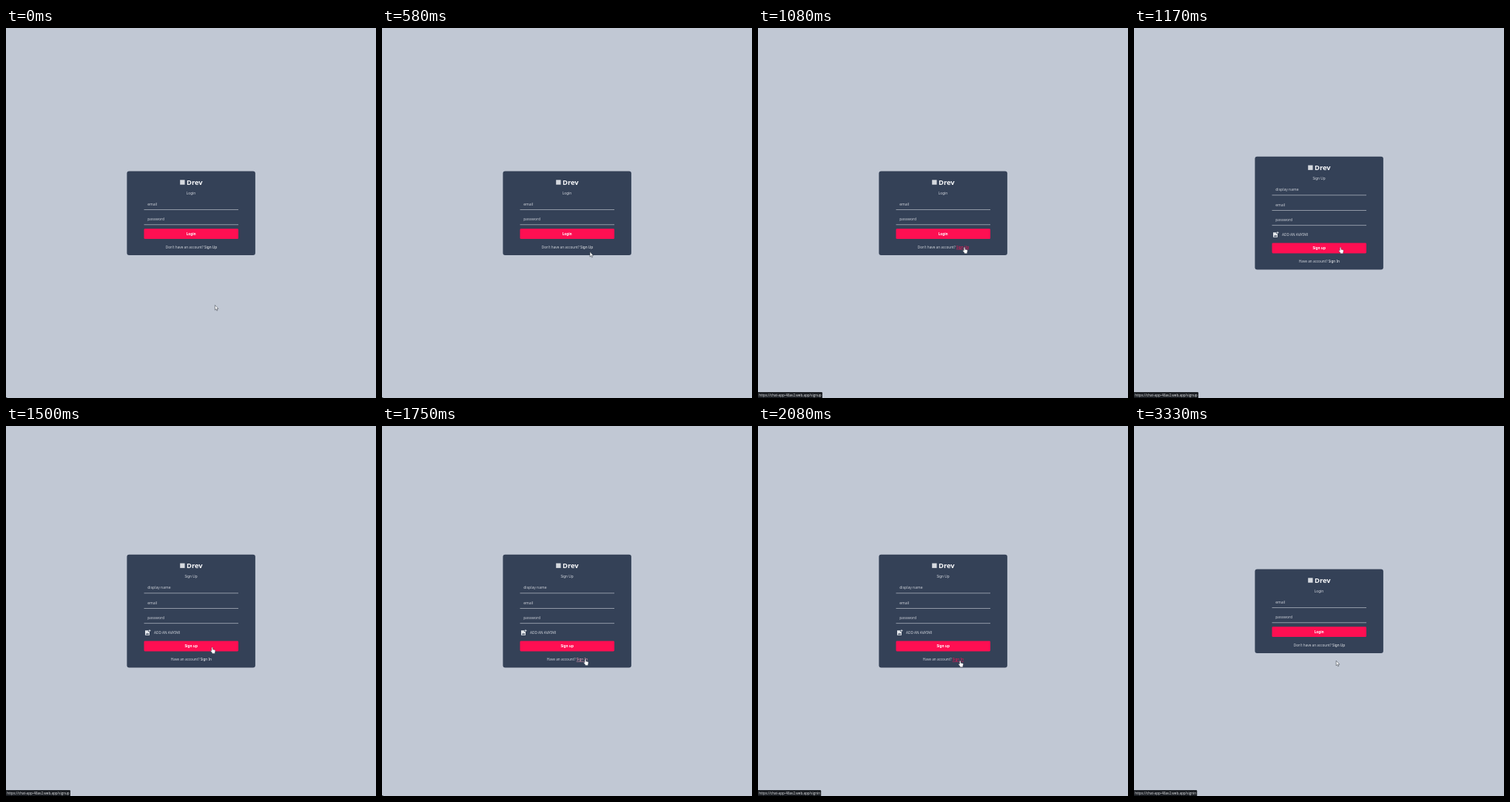
Recreate the animation shown at these times as an HTML page. Size 500 by 500 pixels, loop 3410 ms.

```html
<!DOCTYPE html>
<html lang="en">
<head>
<meta charset="utf-8">
<title>Login and sign up</title>
<style>
  html, body { margin: 0; height: 100%; overflow: hidden; background: #c1c8d4; }
  svg { display: block; width: 100vw; height: 100vh; }
  text { font: 4.7px "Noto Sans", sans-serif; fill: #d3d7de; white-space: pre; }
  .mid { text-anchor: middle; }
  .title { font-size: 9.4px; font-weight: 700; fill: #f7f8fa; }
  .field { font-size: 5px; font-weight: 500; fill: #c9cdd5; }
  .button { font-weight: 700; fill: #fff; }
  .link { fill: #f4f5f7; font-weight: 500; }
  .status { font: 4.6px "Open Sans", sans-serif; fill: #e8eaed; }
</style>
</head>
<body>
<svg viewBox="0 0 500 500">
  <g id="login"></g>
  <g id="signup"></g>
  <rect id="speck" y="499" width="1.4" height="1" fill="#3a4048"/>
  <g id="status">
    <path id="bubble" fill="#1d2025"/>
    <text id="url" class="status" x="1.3" y="497.8"></text>
  </g>
  <path id="arrow" d="M0 0V6.6L1.5 5.3 2.5 7.6 3.5 7.1 2.5 4.9H4.6Z"
        fill="#fff" stroke="#343b47" stroke-width=".55" stroke-linejoin="round"/>
  <path id="hand" d="M-.8 .6Q0-.5 .8 .6V3L3.2 3.5Q4.4 3.8 4.2 5L3.6 7.2V8.6H-.2V7.6L-2.2 5Q-2.3 4-1.4 4.2L-.8 4.8Z"
        fill="#fff" stroke="#343b47" stroke-width=".4" stroke-linejoin="round"/>
</svg>
<script>
const $ = id => document.getElementById(id);
const LOOP = 3410, STEP = 1000 / 12;

const field = (label, y) => `
  <text class="field" x="191.3" y="${y}">${label}</text>
  <rect x="186.5" y="${y + 5.5}" width="127.5" height=".8" fill="#a9b0bb"/>`;

const card = ({ top, height, heading, fields, extra = "", button, buttonY, question, link, linkY }) => `
  <rect x="163.4" y="${top}" width="173.5" height="${height}" rx="3" fill="#344157"/>
  <rect x="235.2" y="${top + 11.8}" width="6.4" height="6.4" fill="#d5d9df"/>
  <text class="title" x="244" y="${top + 18.7}">Drev</text>
  <text class="mid" x="250" y="${top + 31.4}">${heading}</text>
  ${fields.map(([label, y]) => field(label, y)).join("")}
  ${extra}
  <rect x="186.5" y="${buttonY}" width="127.5" height="13.8" rx="1.4" fill="#fe0f52"/>
  <text class="button mid" x="250.2" y="${buttonY + 8.4}">${button}</text>
  <text class="mid" x="250.4" y="${linkY}">${question} <tspan class="link">${link}</tspan></text>`;

const avatarRow = `
  <path d="M188 276.3H192.2V278H194V282.8H188Z" fill="#e4e7ec"/>
  <path d="M188.8 281.8L190.2 280 191.1 281 192.1 279.7 193.3 281.8Z" fill="#344157"/>
  <path d="M194 275V278M192.5 276.5H195.5" stroke="#e4e7ec" stroke-width=".8"/>
  <text x="200" y="280.9">ADD AN AVATAR</text>`;

$("login").innerHTML = card({
  top: 193.5, height: 113.4, heading: "Login",
  fields: [["email", 239.7], ["password", 259.9]],
  button: "Login", buttonY: 271.3,
  question: "Don't have an account?", link: "Sign Up", linkY: 297.8
});
$("signup").innerHTML = card({
  top: 173.7, height: 152.9, heading: "Sign Up",
  fields: [["display name", 220], ["email", 240.5], ["password", 260.8]],
  extra: avatarRow, button: "Sign up", buttonY: 290.6,
  question: "Have an account?", link: "Sign In", linkY: 317.4
});

// Pointer keys: step, x, y
const path = [
  [3, 282.4, 374.5], [4, 282.3, 368], [5, 282, 345], [6, 281.5, 318], [7, 281, 302.5],
  [8, 280, 298], [10, 279, 296.2], [17, 279, 296.2], [18, 278.7, 299], [19, 277.7, 305.5],
  [20, 276, 311.5], [21, 274.8, 315], [24, 273.2, 317.2]
];

function pointerAt(step) {
  const i = path.findIndex(key => key[0] >= step);
  if (i < 0) return path.at(-1).slice(1);
  if (i === 0) return path[0].slice(1);
  const [a, x0, y0] = path[i - 1], [b, x1, y1] = path[i];
  const k = (step - a) / (b - a);
  return [x0 + (x1 - x0) * k, y0 + (y1 - y0) * k];
}

const show = (id, on) => $(id).style.display = on ? "" : "none";
const within = (v, from, to) => v >= from && v < to;

function paintLink(page, hover) {
  const link = $(page).querySelector(".link");
  const mix = (a, b) => Math.round(a + (b - a) * hover);
  link.style.fill = `rgb(${mix(244, 254)},${mix(245, 15)},${mix(247, 82)})`;
  link.style.textDecoration = hover ? "underline #fe0f52" : "none";
}

function draw(time) {
  const step = Math.floor((time % LOOP + 3.5) / STEP);
  const onSignup = within(step, 14, 40);
  show("login", !onSignup);
  show("signup", onSignup);

  const hoverFrom = start => Math.max(0, Math.min(1, (step - start) * .35));
  paintLink("login", step < 14 ? hoverFrom(7) : 0);
  paintLink("signup", hoverFrom(20));

  const [x, y] = pointerAt(step);
  const isHand = within(step, 8, 19) || within(step, 21, 40);
  const shape = isHand ? "hand" : "arrow";
  show("hand", isHand);
  show("arrow", !isHand);
  $(shape).setAttribute("transform", `translate(${x} ${y})`);

  const late = step >= 25;
  const statusOn = late || within(step, 11, 19);
  show("status", statusOn);
  show("speck", !statusOn);
  $("url").textContent = "https://chat-app-48av2.web.app/" + (late ? "signin" : "signup");
  $("bubble").setAttribute("d", `M0 492H${late ? 84 : 85.8}q1.2 0 1.2 1.2V500H0Z`);
}

function tick() {
  draw(performance.now());
  requestAnimationFrame(tick);
}
tick();
</script>
</body>
</html>
```
